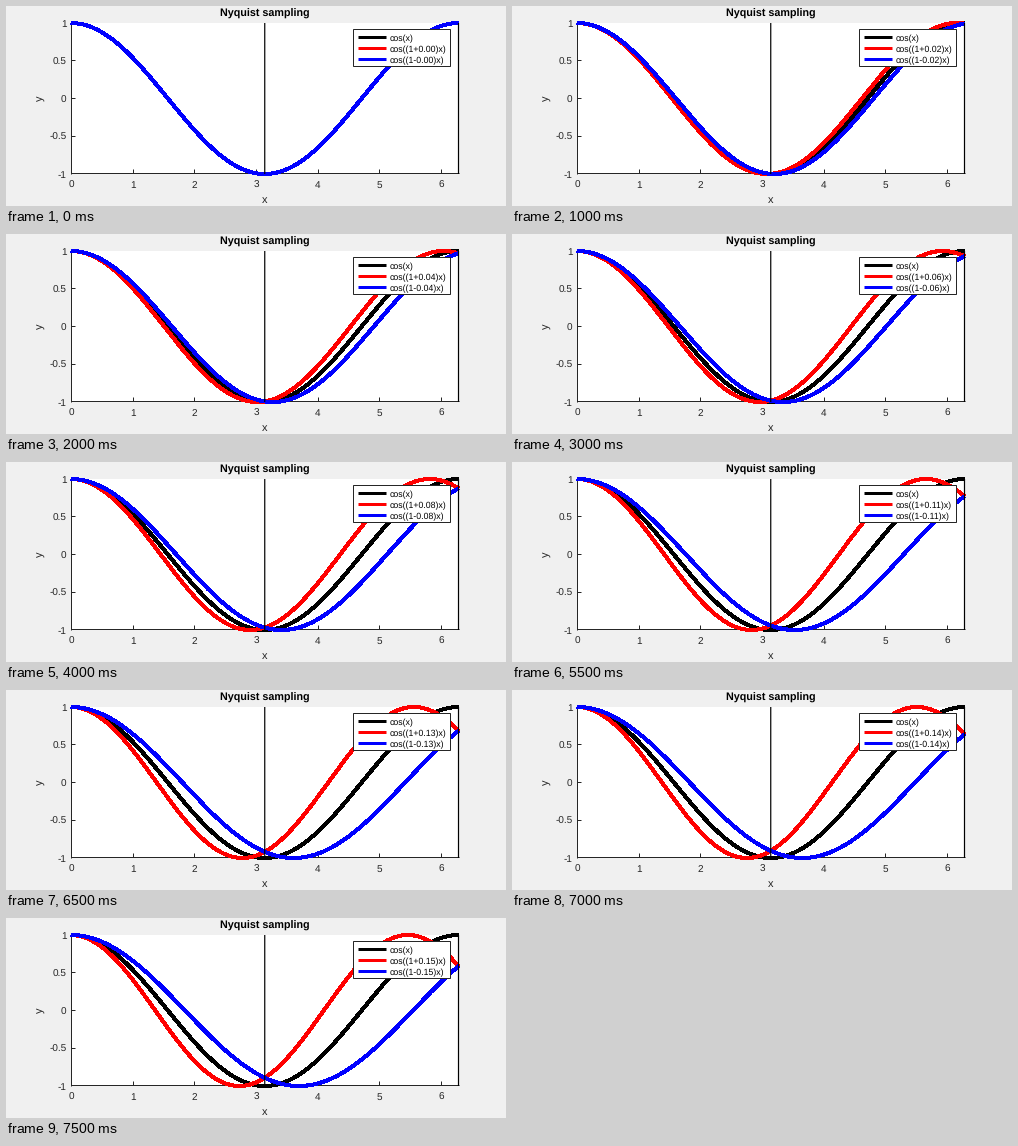
A matplotlib script that plays this animation: 500 by 200 pixels, repeating every 8 s.

```python
import numpy as np
import matplotlib.pyplot as plt
from matplotlib.animation import FuncAnimation
from matplotlib.patches import Rectangle

W, H, DPI = 500, 200, 100
PX = 72 / DPI                      # points per pixel
LEFT, RIGHT, TOP, BOTTOM = 65, 452.5, 17, 168
AXIS_Y = BOTTOM - 1                # last pixel row of the plot area
INK = "#262626"
STEPS, STEP_MS, STEP_EPS = 16, 500, 0.01

plt.rcParams["font.family"] = "Liberation Sans"
plt.rcParams["text.hinting"] = "none"


def px(x):
    return LEFT + (RIGHT - LEFT) * x / (2 * np.pi)


def py(y):
    return (TOP + BOTTOM) / 2 - (BOTTOM - TOP) / 2 * y


fig = plt.figure(figsize=(W / DPI, H / DPI), dpi=DPI, facecolor="#f0f0f0")
ax = fig.add_axes([0, 0, 1, 1])
ax.set_xlim(0, W)
ax.set_ylim(H, 0)
ax.axis("off")


def line(xs, ys, color=INK, width=1.0, z=2, **kw):
    return ax.plot(xs, ys, color=color, lw=width * PX, zorder=z,
                   solid_capstyle="butt", **kw)[0]


def label(x, y, s, size=10, color=INK, ha="center", va="baseline", **kw):
    return ax.text(x, y, s, size=size * PX, color=color, ha=ha, va=va,
                   zorder=8, **kw)


# Plot area, axes and ticks
ax.add_patch(Rectangle((LEFT, TOP), RIGHT - LEFT, BOTTOM - TOP,
                       fc="white", ec="none", zorder=1))
line([LEFT, LEFT], [TOP, BOTTOM])
line([LEFT, RIGHT], [AXIS_Y, AXIS_Y])
for v in range(7):
    line([px(v)] * 2, [AXIS_Y, AXIS_Y - 4])
    label(px(v), 182, str(v))
for v in (-1, -0.5, 0, 0.5, 1):
    line([LEFT, LEFT + 4], [py(v) - 0.75] * 2)
    label(60.5, py(v) + 4, f"{v:g}", ha="right")

label(259, 11, "Nyquist sampling", size=10.8, color="black", weight="bold")
label(259, 197, "x", size=11)
label(34.5, 92.5, "y", size=11, va="center", rotation=90)

# Curves, with markers at pi and 2 pi
x = np.linspace(0, 2 * np.pi, 400)
COLORS = ("black", "red", "blue")
curves = [line(px(x), py(np.cos(x)), c, 3, 3 + 0.1 * i, antialiased=False)
          for i, c in enumerate(COLORS)]
for v in (np.pi, 2 * np.pi):
    line([px(v)] * 2, [TOP, BOTTOM], "black", 1.2, 4, snap=False)

# Legend
ax.add_patch(Rectangle((347, 23), 97, 37, fc="white", ec=INK,
                       lw=PX, zorder=6))
names = []
for i, c in enumerate(COLORS):
    y = 31 + 11 * i
    line([352, 380], [y, y], c, 3, 7)
    names.append(label(384, y + 4, "cos(x)", size=8.8, color="black",
                       ha="left"))


def update(n):
    eps = n * STEP_EPS
    for sign, curve, name in zip((1, -1), curves[1:], names[1:]):
        curve.set_ydata(py(np.cos((1 + sign * eps) * x)))
        name.set_text(f"cos((1{'+' if sign > 0 else '-'}{eps:.2f})x)")
    return curves[1:] + names[1:]


anim = FuncAnimation(fig, update, frames=STEPS, interval=STEP_MS,
                     repeat=True, repeat_delay=0)
plt.show()
```
